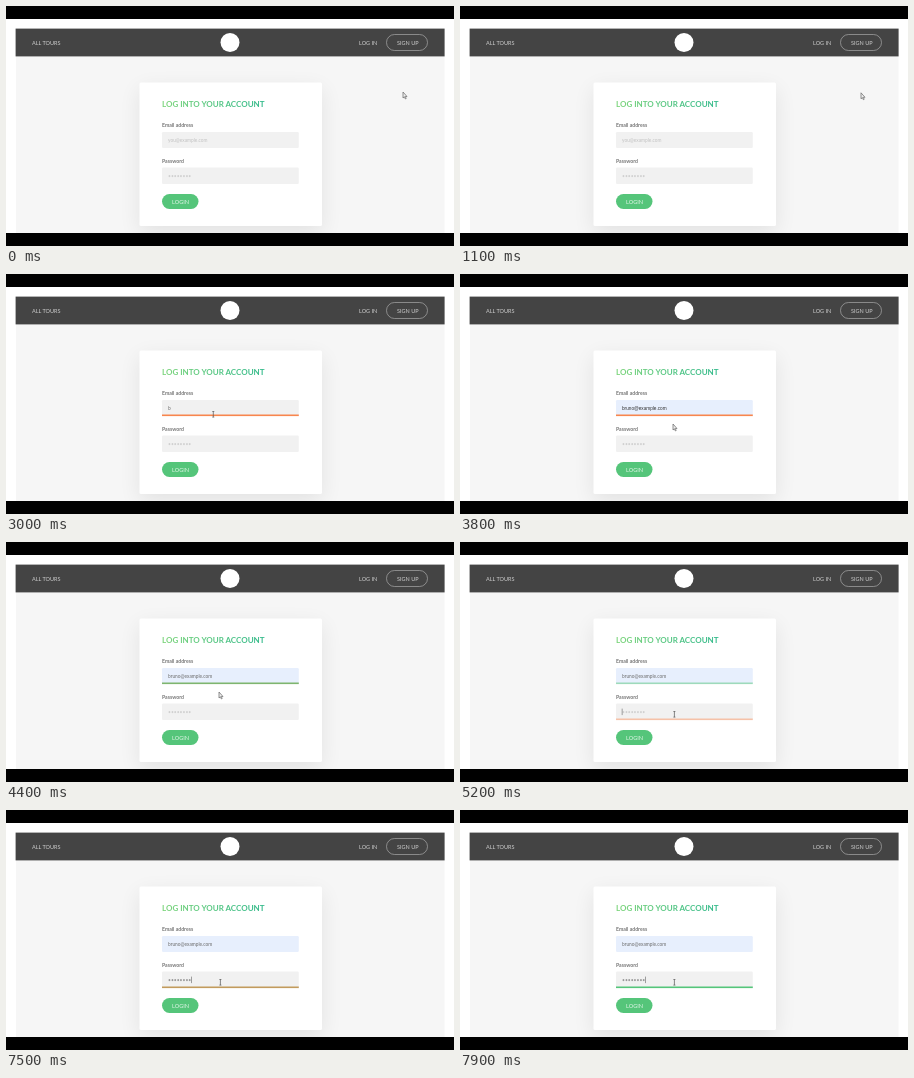
Recreate the animation shown at these times as an HTML page. Size 448 px wide and 240 px high, loop 8000 ms.

```html
<!DOCTYPE html>
<html lang="en">
<head>
<meta charset="utf-8">
<title>Log in</title>
<style>
  html, body { margin: 0; width: 100%; height: 100%; overflow: hidden; background: #000; }
  svg { display: block; width: 448px; height: 240px; font-family: Lato, sans-serif; }
  .nav { font-size: 5.5px; fill: #d0d0d0; }
  .button { font-size: 5.6px; fill: #e4f6ea; }
  .label { font-size: 5.15px; font-weight: 700; fill: #777; }
  .hint { font-size: 4.8px; fill: #c2c2c2; }
  .value { font-size: 4.8px; fill: #6c6c6c; }
  .preview { font-family: "Liberation Sans", sans-serif; font-size: 4.7px; fill: #333; }
  .dots { font-size: 5px; }
  .hint.dots { fill: #d0d0d0; }
  .value.dots { fill: #999; }
</style>
</head>
<body>
<svg viewBox="0 0 448 240">
  <defs>
    <linearGradient id="leaf">
      <stop offset="0" stop-color="#7ed57c"/>
      <stop offset="1" stop-color="#34ba8c"/>
    </linearGradient>
    <clipPath id="page"><rect x="10" y="50" width="428" height="177"/></clipPath>
    <filter id="soft" x="-30%" y="-30%" width="160%" height="160%">
      <feGaussianBlur stdDeviation="11"/>
    </filter>
  </defs>

  <rect width="448" height="240"/>
  <rect y="13" width="448" height="214" fill="#fff"/>
  <rect x="10" y="50" width="428.500" height="177" fill="#f6f6f6"/>
  <rect x="9.600" y="22.600" width="429" height="27.800" fill="#444"/>

  <g class="nav">
    <text x="26" y="38.8">ALL TOURS</text>
    <text x="353" y="38.8">LOG IN</text>
    <text x="391" y="38.8">SIGN UP</text>
  </g>
  <rect x="380.5" y="28.5" width="41" height="16" rx="8" fill="none" stroke="#bbb" stroke-width=".6"/>
  <circle cx="224" cy="36.5" r="9.5" fill="#fff"/>

  <g clip-path="url(#page)">
    <rect x="133.500" y="83" width="182.500" height="144" fill="#000" opacity=".08" filter="url(#soft)"/>
    <rect x="133.500" y="76.500" width="182.500" height="143.500" rx="1.500" fill="#fff"/>
  </g>

  <text x="156" y="101" font-size="8" font-weight="700" fill="url(#leaf)">LOG INTO YOUR ACCOUNT</text>

  <text class="label" x="156" y="121">Email address</text>
  <rect id="mailBox" x="156" y="126" width="136.800" height="16" rx="1.300"/>
  <rect id="mailLine" x="156" y="140.500" width="136.800" height="1.600"/>
  <text id="mail" x="162" y="135.800"></text>

  <text class="label" x="156" y="157">Password</text>
  <rect x="156" y="161.500" width="136.800" height="16.500" rx="1.300" fill="#f1f1f1"/>
  <rect id="passLine" x="156" y="176.500" width="136.800" height="1.600"/>
  <text id="pass" x="162" y="171.800"></text>

  <rect x="156" y="188" width="36.500" height="15" rx="7.500" fill="#55c57a"/>
  <text class="button" x="166" y="197.500">LOGIN</text>

  <rect id="caret" width=".6" height="6.500" fill="#666"/>
  <path id="arrow" d="M0 0V6L1.400 4.800L2.300 6.900L3.200 6.500L2.300 4.500H4Z" fill="#eee" stroke="#666" stroke-width=".7" stroke-linejoin="round"/>
  <path id="beam" d="M-1-2.800H1M0-2.800V2.800M-1 2.800H1" fill="none" stroke="#555" stroke-width=".7"/>
</svg>
<script>
const LOOP = 8000, STEP = 100;
const el = id => document.getElementById(id);
const ORANGE = [248, 134, 78], GREEN = [85, 197, 122];
const EMAIL = 'bruno@example.com';

// Pointer stops: time, x, y
const path = [
  [0, 397, 86], [1000, 397, 86], [1100, 401, 86.8], [1300, 401, 86.8],
  [1400, 382, 92], [1600, 382, 92], [1800, 312, 111], [2000, 222, 137], [2100, 207.3, 140.3],
  [3500, 207.3, 140.3], [3600, 209.5, 145], [3800, 213, 150],
  [4600, 213, 150], [4700, 214, 165], [4800, 214.4, 172.3]
];
const mailShow = [[2200, 0], [2300, .65], [2500, 1], [5100, 1], [5200, .5], [5400, 0]];
const mailValid = [[4100, 0], [4500, 1]];
const passShow = [[5100, 0], [5200, .45], [5400, 1]];
const passValid = [[7400, 0], [7700, 1]];
const keys = [5700, 6000, 6300, 6500, 6800, 7000, 7200, 7500];

function at(table, t, col = 1) {
  const i = table.findIndex(row => row[0] > t);
  if (i < 0) return table[table.length - 1][col];
  if (i === 0) return table[0][col];
  const a = table[i - 1], b = table[i];
  return a[col] + (b[col] - a[col]) * (t - a[0]) / (b[0] - a[0]);
}

function line(id, show, valid) {
  const rgb = ORANGE.map((c, i) => Math.round(c + (GREEN[i] - c) * valid));
  el(id).setAttribute('fill', `rgb(${rgb})`);
  el(id).setAttribute('opacity', show);
}

function write(id, text, style) {
  const node = el(id);
  if (node.textContent !== text) node.textContent = text;
  node.setAttribute('class', style);
}

function place(id, visible, x, y) {
  el(id).setAttribute('visibility', visible ? 'visible' : 'hidden');
  el(id).setAttribute('transform', `translate(${x} ${y})`);
}

function draw(t) {
  line('mailLine', at(mailShow, t), at(mailValid, t));
  line('passLine', at(passShow, t), at(passValid, t));
  el('mailBox').setAttribute('fill', t < 3600 ? '#f1f1f1' : '#e7effd');

  if (t < 2700) write('mail', 'you@example.com', 'hint');
  else if (t < 3600) write('mail', EMAIL.slice(0, t < 3400 ? 1 : 2), 'value');
  else write('mail', EMAIL, t < 4200 ? 'preview' : 'value');

  const typed = keys.filter(k => k <= t).length;
  write('pass', '•'.repeat(typed || 8), typed ? 'value dots' : 'hint dots');

  if (t < 5200) place('caret', t >= 2300 && t < 2700, 161.8, 130.8);
  else place('caret', t < 5700 || t >= 7200, 161.8 + typed * 2.9, 166.6);

  const x = at(path, t), y = at(path, t, 2);
  const beam = t >= 2100 && t < 3600 || t >= 4800;
  place('arrow', !beam, x, y);
  place('beam', beam, x, y);
}

function tick() {
  draw(Math.floor(performance.now() % LOOP / STEP) * STEP);
  requestAnimationFrame(tick);
}
tick();
</script>
</body>
</html>
```
